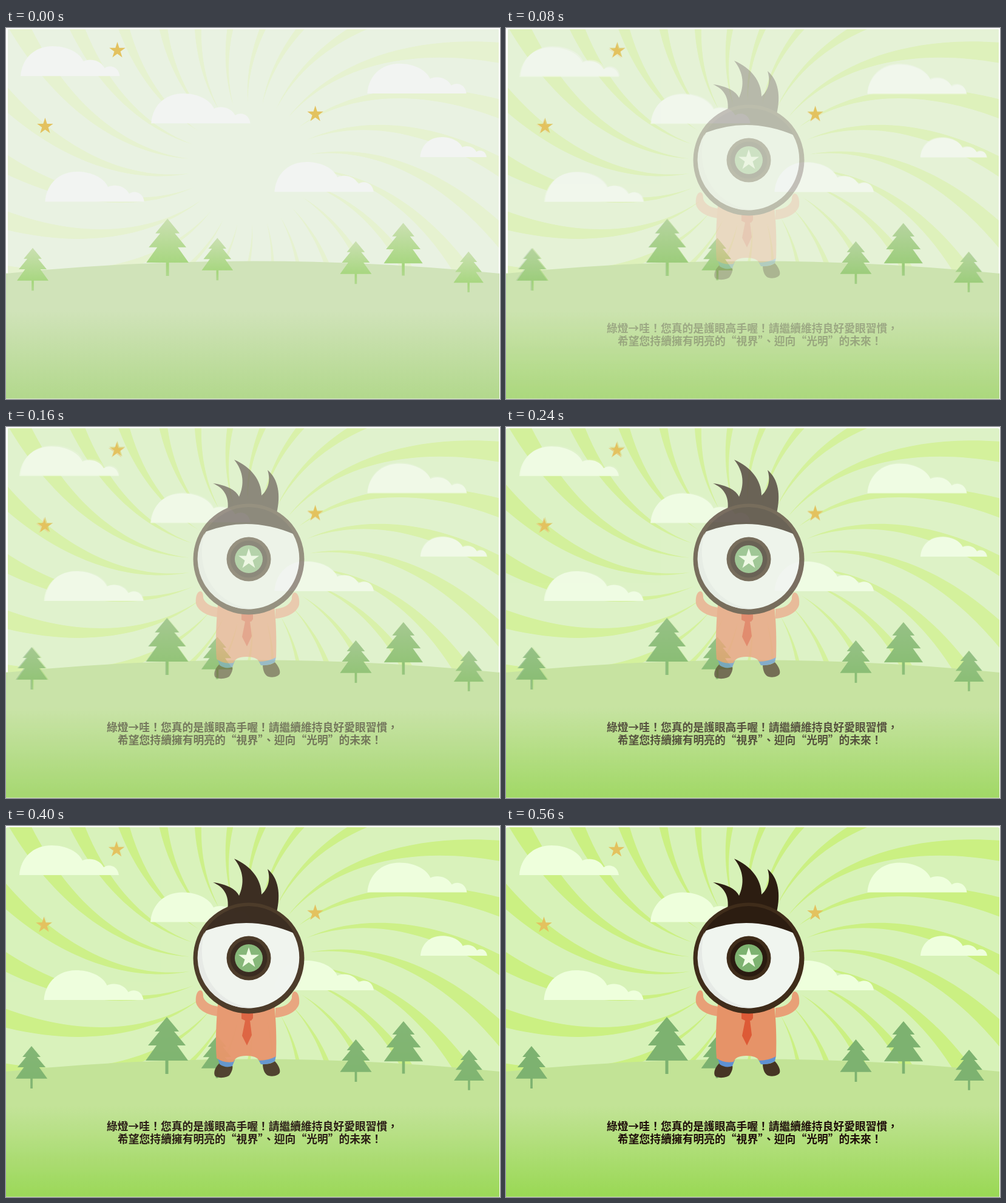
An HTML page without scripts that plays this animation: 814 by 612 pixels, repeating every 800 ms.

```html
<!DOCTYPE html>
<html lang="zh-TW">
<head>
<meta charset="utf-8">
<title>Green light</title>
<style>
  html, body { margin: 0; width: 100%; height: 100%; overflow: hidden; background: #fff; }
  svg { display: block; width: 814px; height: 612px; }

  .pale {
    --sky: #e9f2e2; --ray: #e6f2d0; --cloud: #f2f4f2;
    --tree: url(#paleTree); --hill: url(#paleHill);
    --shift: matrix(.996, 0, 0, 1.0055, 2.2, -2.2);
  }
  .vivid {
    --sky: #d7f2b8; --ray: #cbf082; --cloud: #eeffdc;
    --tree: #7db270; --hill: url(#vividHill);
    --shift: none;
  }
  .sky { fill: var(--sky); }
  .rays { fill: var(--ray); }
  .clouds { fill: var(--cloud); }
  .stars { fill: #e3c25f; }
  .trees { fill: var(--tree); }
  .hill { fill: var(--hill); }
  .shifted { transform: var(--shift); }

  .reveal { animation: reveal .8s step-end infinite; }
  .margin { fill: #fff; animation: margin .8s step-end infinite; }

  .message {
    font: 900 17.8px "Noto Sans CJK TC", "Noto Sans CJK", sans-serif;
    fill: #1c0a08;
  }

  /* quadratic ease-out in 14 steps of 40 ms, then a hold */
  @keyframes reveal {
    0% { opacity: 0; }
    5% { opacity: .138; }
    10% { opacity: .265; }
    15% { opacity: .383; }
    20% { opacity: .49; }
    25% { opacity: .587; }
    30% { opacity: .673; }
    35% { opacity: .75; }
    40% { opacity: .816; }
    45% { opacity: .872; }
    50% { opacity: .918; }
    55% { opacity: .954; }
    60% { opacity: .98; }
    65% { opacity: .995; }
    70%, 100% { opacity: 1; }
  }
  @keyframes margin {
    0% { opacity: 1; }
    25%, 100% { opacity: 0; }
  }
</style>
</head>
<body>
<svg viewBox="0 0 814 612">
  <defs>
    <linearGradient id="paleTree" x2="0" y2="1">
      <stop stop-color="#cbe0b2"/><stop offset=".8" stop-color="#a6d67e"/><stop offset="1" stop-color="#b0d88e"/>
    </linearGradient>
    <linearGradient id="paleHill" x2="0" y2="1">
      <stop offset=".36" stop-color="#d0e3b9"/><stop offset="1" stop-color="#b2d88c"/>
    </linearGradient>
    <linearGradient id="vividHill" x2="0" y2="1">
      <stop offset=".34" stop-color="#c2e396"/><stop offset="1" stop-color="#99d854"/>
    </linearGradient>
    <clipPath id="skyArea"><rect y="2" width="813" height="410" rx="3"/></clipPath>

    <!-- 26 rays, built by doubling -->
    <path id="ray" d="M100,0C215,-4 363,71 473,285L433,303C347,89 215,4 100,0z"/>
    <g id="rays2"><use href="#ray"/><use href="#ray" transform="rotate(13.846)"/></g>
    <g id="rays4"><use href="#rays2"/><use href="#rays2" transform="rotate(27.692)"/></g>
    <g id="rays8"><use href="#rays4"/><use href="#rays4" transform="rotate(55.385)"/></g>
    <g id="rays26">
      <use href="#rays8"/>
      <use href="#rays8" transform="rotate(110.769)"/>
      <use href="#rays8" transform="rotate(221.538)"/>
      <use href="#rays2" transform="rotate(332.308)"/>
    </g>

    <path id="cloud" d="M0,0C2,-28 22,-49 53,-49C78,-49 98,-38 104,-24C111,-28 130,-29 139,-13C147,-19 162,-16 164,0z"/>
    <path id="star" d="M0,-14L8.2,11.3L-13.3,-4.3H13.3L-8.2,11.3z"/>
    <path id="tree" d="M0,0L20,24H12L31,47H17L35,72H2.5V94H-2.5V72H-35L-17,47H-31L-12,24H-20z"/>
    <path id="arm" d="M320,271C314,272 312,282 313,291C316,304 334,313 352,314V298C340,297 328,292 325,282C325,276 324,271 320,271z"/>

    <g id="scene">
      <g clip-path="url(#skyArea)">
        <rect class="sky" width="814" height="412"/>
        <use class="rays" href="#rays26" transform="translate(402 224) rotate(143.3)"/>
      </g>
      <path class="hill" d="M0,405Q407,364 813,405V611.5H0z"/>
      <g class="shifted">
        <g class="clouds">
          <use href="#cloud" x="22" y="81"/>
          <use href="#cloud" x="238" y="158.5"/>
          <use href="#cloud" x="62.5" y="287"/>
          <use href="#cloud" x="595.5" y="109.5"/>
          <use href="#cloud" x="442" y="271"/>
          <use href="#cloud" transform="translate(683 214) scale(.67)"/>
        </g>
        <g class="stars">
          <use href="#star" x="182" y="39"/>
          <use href="#star" x="62.5" y="163.5"/>
          <use href="#star" x="509.5" y="143.5"/>
        </g>
        <g class="trees">
          <use href="#tree" x="265" y="315"/>
          <use href="#tree" transform="translate(347.5 346.5) scale(.74)"/>
          <use href="#tree" transform="translate(42 363) scale(.745)"/>
          <use href="#tree" transform="translate(576.5 352) scale(.745)"/>
          <use href="#tree" transform="translate(655 322) scale(.92)"/>
          <use href="#tree" transform="translate(763 369) scale(.71)"/>
        </g>
      </g>
    </g>
  </defs>

  <use class="pale" href="#scene"/>

  <g class="reveal">
    <use class="vivid" href="#scene"/>

    <g id="body">
      <g fill="#463524">
        <path d="M352,391C344,398 341,408 345,413C352,417 366,415 369,410C373,404 374,398 373,395Q362,398 352,391z"/>
        <path d="M423,392C423,402 427,411 433,412C441,414 449,411 451,407C453,401 447,392 443,388Q434,394 423,392z"/>
      </g>
      <g fill="#5f91d2">
        <path d="M348,381L352,393Q362,400 373,396L377,386z"/>
        <path d="M415,384L420,393Q434,394 443,388L445,379z"/>
      </g>
      <g fill="#e8a077">
        <use href="#arm"/>
        <use href="#arm" transform="matrix(-1 0 0 1 796 2)"/>
      </g>
      <path fill="#e69368" d="M349,294C346,325 345,360 347,383Q360,392 375,389Q378,379 396,379Q413,379 417,387Q432,387 445,380C446,350 445,320 442,294z"/>
      <path fill="#dd5a36" d="M388,304H407V317L404,321H402L405,345L397,362L389,346L394,321L388,318z"/>
    </g>

    <g id="head">
      <path fill="#2c1d11" d="M365,140C369,112 357,100 341,93C364,96 379,104 384,115C393,95 392,74 376,54C404,66 421,88 421,113C431,104 437,90 431,71C449,86 453,112 446,142z"/>
      <circle cx="400" cy="218" r="91.5" fill="#3f2c1a"/>
      <circle cx="400" cy="217" r="83.3" fill="#f0f5ef"/>
      <path fill="#e6eae6" d="M327,175A83.3,83.3 0 0 0 408,299.9C352,296 309,245 327,175z"/>
      <path fill="#2c1d11" d="M328,173A84.5,84.5 0 0 1 475,177Q400,145 328,173z"/>
      <circle cx="400" cy="218" r="36.5" fill="#3f2c1a"/>
      <circle cx="400" cy="218" r="30.5" fill="#2a1b10"/>
      <circle cx="400" cy="218" r="23" fill="#7db270"/>
      <use href="#star" fill="#f0fde4" transform="translate(400 218) scale(1.28)"/>
    </g>

    <g class="message">
      <text x="166" y="502">綠燈→哇！您真的是護眼高手喔！請繼續維持良好愛眼習慣，</text>
      <text x="184" y="523">希望您持續擁有明亮的“視界”、迎向“光明”的未來！</text>
    </g>
  </g>

  <path class="margin" d="M0,0H3V404.5H0zM812,0H814V404.5H812z"/>
</svg>
</body>
</html>
```
